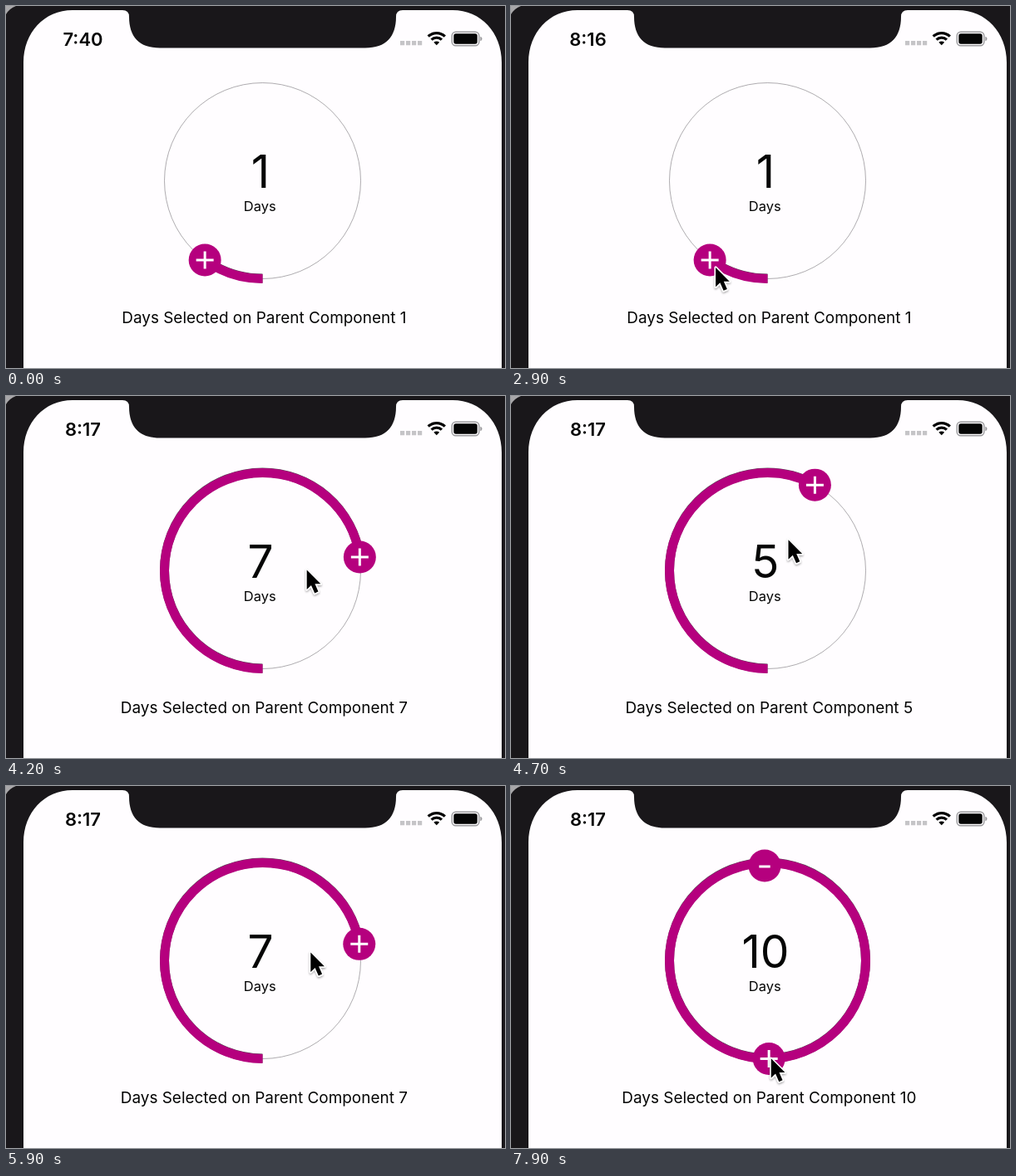
An HTML page for the animation above (8 s loop, 600x436 px).

```html
<!DOCTYPE html>
<html lang="en">
<head>
<meta charset="utf-8">
<title>Day picker</title>
<style>
  html, body { margin: 0; width: 100%; height: 100%; overflow: hidden; background: #fffdff; }
  svg { display: block; width: 100%; height: 100%; }
  text { font-family: Inter, "Liberation Sans", sans-serif; text-anchor: middle; fill: #050505; }
</style>
</head>
<body>
<svg viewBox="0 0 600 436">
  <defs>
    <path id="ring" pathLength="360" fill="none" d="M308.5 328.5a118 118 0 0 1 0-236a118 118 0 0 1 0 236"/>
    <g id="disc"><circle r="19.5" fill="#b5007e"/></g>
    <filter id="soft" x="-50%" y="-50%" width="200%" height="200%">
      <feDropShadow dx="0" dy="1.5" stdDeviation="1.3" flood-opacity=".35"/>
    </filter>
  </defs>

  <!-- phone -->
  <rect width="600" height="436" fill="#19171a"/>
  <path d="M0 0H12Q4 3 0 10Z" fill="#a9a8aa"/>
  <path fill="#fffdff" d="M21 436V68C21 32 46 5 80 5H140Q148 5 148 13C148 37 160 50.5 185 50.5H432C457 50.5 469 37 469 13Q469 5 477 5H537C571 5 596 32 596 68V436Z"/>

  <!-- status bar -->
  <text id="clock" x="92.5" y="47.5" font-size="22" font-weight="600"></text>
  <path d="M474 44.6H502" stroke="#c5c4c7" stroke-width="5.2" stroke-dasharray="5.2 1.8"/>
  <g fill="none" stroke="#050505" stroke-width="3.3">
    <path d="M507.7 36.7a14.2 14.2 0 0 1 20.1 0"/>
    <path d="M511.6 40.7a8.7 8.7 0 0 1 12.3 0"/>
    <path d="M517.75 47.2l-3.4-3.4a4.8 4.8 0 0 1 6.8 0Z" fill="#050505" stroke="none"/>
  </g>
  <rect x="536.2" y="31.2" width="32.6" height="16.6" rx="4.5" fill="none" stroke="#9a999c" stroke-width="1.4"/>
  <rect x="538.3" y="33.3" width="28.4" height="12.4" rx="2.6" fill="#050505"/>
  <path d="M570.3 36.7q2.2 .7 2.2 2.8t-2.2 2.8Z" fill="#9a999c"/>

  <!-- picker -->
  <use href="#ring" stroke="#77757a" stroke-width=".6"/>
  <use href="#ring" class="arc" y="-.6" stroke="#5a4a58" stroke-width="11"/>
  <use href="#ring" class="arc" stroke="#b5007e" stroke-width="11"/>
  <g id="minus" transform="translate(305 96)" stroke="#fff" stroke-width="3">
    <use href="#disc" stroke="none"/>
    <path d="M-6.7 1H6.7"/>
  </g>
  <g id="plus" stroke="#fff" stroke-width="3">
    <use href="#disc" stroke="none"/>
    <path d="M-10.5 0H10.5M0-10.5V10.5"/>
  </g>
  <text id="count" x="306" y="219" font-size="55"></text>
  <text x="305.2" y="247" font-size="16.5">Days</text>
  <text id="label" x="310.3" y="381.7" font-size="18.95"></text>

  <g id="cursor" filter="url(#soft)">
    <path transform="translate(.8 1.3) scale(1.06)" d="M0 0V22L5 17.3L9 26.3L13 24.5L9.2 15.8H15.7Z" stroke="#fff" stroke-width="3" paint-order="stroke" stroke-linejoin="round"/>
  </g>
</svg>
<script>
  const LOOP = 8000, STEP = 100, CX = 308.5, CY = 210.5, R = 118;
  const $ = id => document.getElementById(id);
  const arcs = document.querySelectorAll('.arc');

  // Angles are degrees clockwise from the bottom; reach is the cursor's distance from the centre
  const rest = { knob: 36, aim: -5, reach: 240 };
  const moves = [
    { from: 500, to: 1100, aim: 40.6, reach: 130 },
    { from: 1800, to: 2200, aim: 36.8, reach: 124 },
    { from: 2500, to: 2900, aim: 31.5, reach: 121 },
    { from: 3000, to: 4350, knob: 270, aim: 276, reach: 50 },
    { from: 4350, to: 5250, knob: 88, aim: 86, reach: 36.5 },
    { from: 5250, to: 6350, knob: 359.2, aim: 358.3, reach: 70.5 },
    { from: 6350, to: 7900, reach: 116.5 }
  ];

  function ease(t, from, to) {
    const u = Math.min(1, Math.max(0, (t - from) / (to - from)));
    return u * u * (3 - 2 * u);
  }

  function pose(t) {
    const p = { ...rest };
    for (const { from, to, ...goal } of moves) {
      const k = ease(t, from, to);
      for (const key in goal) p[key] += (goal[key] - p[key]) * k;
    }
    return p;
  }

  function place(el, deg, r) {
    const a = deg * Math.PI / 180;
    el.setAttribute('transform', `translate(${CX - r * Math.sin(a)} ${CY + r * Math.cos(a)})`);
  }

  function show(el, on) {
    el.style.display = on ? '' : 'none';
  }

  function render(t) {
    const { knob, aim, reach } = pose(t);
    const full = knob >= 359;
    const days = full ? 10 : Math.floor(knob / 36);
    for (const arc of arcs) arc.setAttribute('stroke-dasharray', full ? 'none' : `${knob} 400`);
    place($('plus'), knob, R);
    place($('cursor'), aim, reach);
    show($('minus'), full);
    show($('cursor'), t >= 600);
    $('count').textContent = days;
    $('label').textContent = 'Days Selected on Parent Component ' + days;
    $('clock').textContent = t < 600 ? '7:40' : t < 3500 ? '8:16' : '8:17';
  }

  const start = performance.now();
  function tick() {
    const t = (performance.now() - start) % LOOP;
    render(Math.floor(t / STEP) * STEP);
    requestAnimationFrame(tick);
  }
  tick();
</script>
</body>
</html>
```
